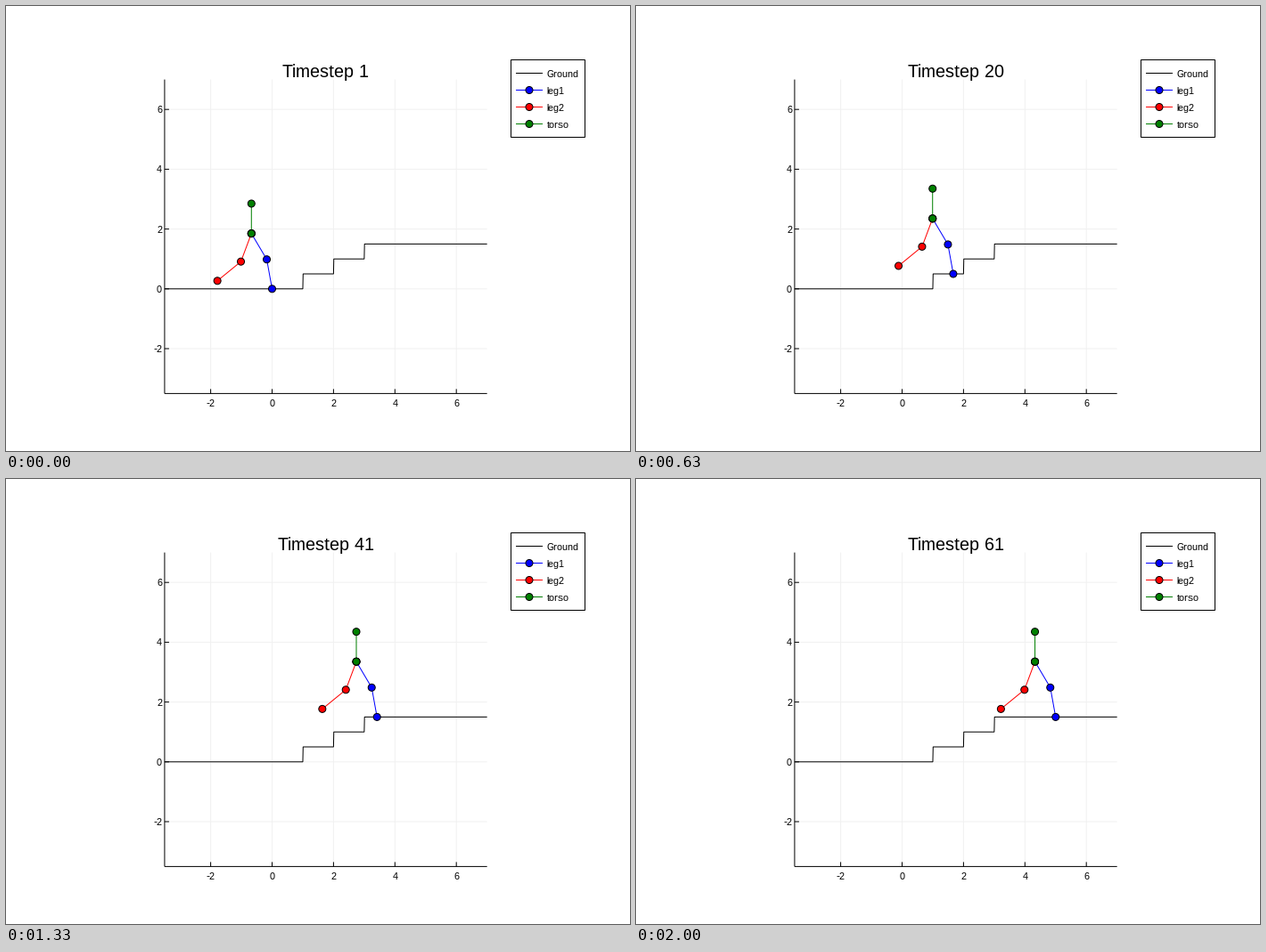
Recreate the animation shown at these times as a matplotlib script. Size 700 by 500 pixels, loop 2.03 s.

```python
import numpy as np
import matplotlib.pyplot as plt
from matplotlib.animation import FuncAnimation
from matplotlib.patches import Circle, Rectangle

W, H, DPI = 700, 500, 100
PX = 72 / DPI                      # points per pixel
LO, HI = -3.5, 7
STEPS = 60

plt.rcParams.update({
    "font.family": "Liberation Sans",
    "text.hinting": "default",
    "text.hinting_factor": 1,
    "path.simplify": False,
    "path.snap": False,
})

fig = plt.figure(figsize=(W / DPI, H / DPI), dpi=DPI, facecolor="white")
ax = fig.add_axes([0, 0, 1, 1])
ax.set(xlim=(0, W), ylim=(H, 0))
ax.axis("off")


def to_px(x, y):
    return 298.5 + 34.45 * np.asarray(x), 317.8 - 33.6 * np.asarray(y)


def line(xs, ys, color="black", z=2):
    item, = ax.plot(xs, ys, color=color, lw=PX, zorder=z, snap=False,
                    solid_capstyle="butt", solid_joinstyle="miter")
    return item


def dot(x, y, color, z):
    return ax.add_patch(Circle((x, y), 4, fc=color, ec="black", lw=PX, zorder=z))


def label(x, y, text, size=11, ha="center"):
    return ax.text(x, y, text, fontsize=size * PX, ha=ha, va="baseline", zorder=9)


def ground(x):
    return 0.5 * sum(x > edge for edge in (1, 2, 3))


def draw_axes():
    left, bottom = to_px(LO, LO)
    right, top = to_px(HI, HI)
    for v in range(-2, 7, 2):
        x, y = to_px(v, v)
        line([x, x], [bottom, top], "#f1f1f1", 1)
        line([left, right], [y, y], "#f1f1f1", 1)
        line([x, x], [bottom, bottom - 5])
        line([left, left + 5], [y, y])
        label(x, 450, str(v))
        label(175, y + 4, str(v), ha="right")
    line([left, left], [bottom, top])
    line([left, right], [bottom, bottom])

    xs, ys = [LO], [0]
    for edge in (1, 2, 3):
        xs += [edge, edge + 0.01]
        ys += [ground(edge), ground(edge + 0.01)]
    line(*to_px(xs + [HI], ys + [1.5]), z=3)


def draw_legend():
    ax.add_patch(Rectangle((566.5, 60.5), 83, 87, fc="white", ec="black",
                           lw=PX, snap=False))
    rows = [("Ground", "black"), ("leg1", "blue"), ("leg2", "red"), ("torso", "green")]
    for i, (name, color) in enumerate(rows):
        y = 75.5 + 19 * i
        line([572, 602], [y, y], color, 3)
        if i:
            dot(587, y, color, 4)
        label(606.4, y + 4.5, name, ha="left")


class Limb:
    def __init__(self, color, count, z):
        self.line = line([], [], color, z)
        self.dots = [dot(0, 0, color, z + 0.5) for _ in range(count)]

    def place(self, points):
        xs, ys = to_px(*np.transpose(points))
        self.line.set_data(xs, ys)
        for d, x, y in zip(self.dots, xs, ys):
            d.center = x, y


def link(deg):
    a = np.radians(deg)
    return np.array([np.sin(a), np.cos(a)])


draw_axes()
draw_legend()
title = label(358.7, 80, "", 20)
leg1, leg2, torso = Limb("blue", 3, 4), Limb("red", 3, 5), Limb("green", 2, 6)


def update(n):
    step = 1 + int((n + 0.5) * 0.3)
    x = 0 if step == 1 else min(step, STEPS) * 5 / STEPS
    foot = np.array([x, ground(x)])
    knee = foot + link(-10)
    hip = knee + link(-30)
    back_knee = hip - link(20)
    back_foot = back_knee - link(50)

    front, back = (leg1, leg2) if step // 10 % 2 == 0 else (leg2, leg1)
    front.place([foot, knee, hip])
    back.place([back_foot, back_knee, hip])
    torso.place([hip, hip + link(0)])
    title.set_text(f"Timestep {step}")
    return []


anim = FuncAnimation(fig, update, frames=203, interval=10,
                     repeat=True, repeat_delay=0, blit=False)
plt.show()
```
